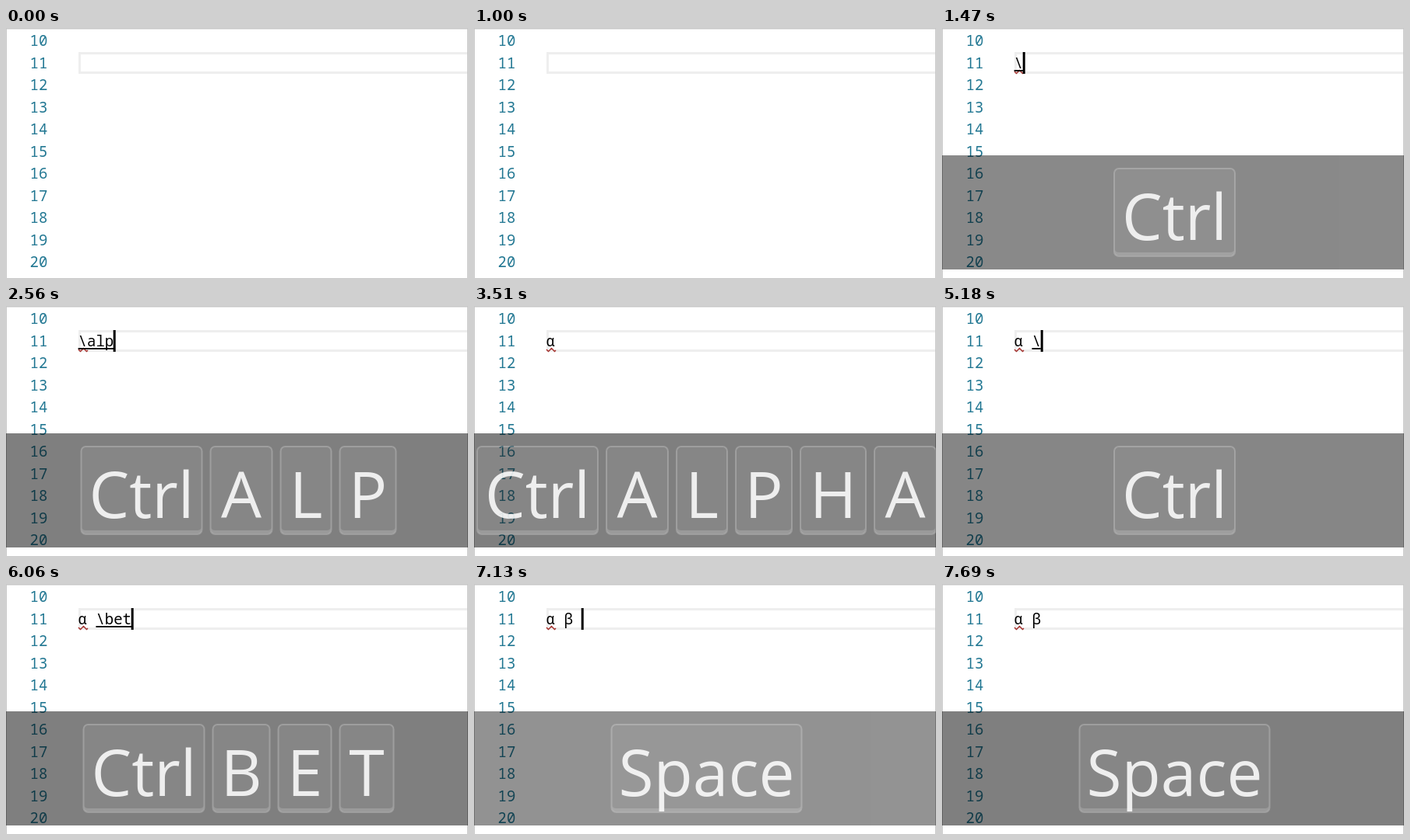
These frames come from a looping animation (593x322 px, 7990 ms). An HTML page:

```html
<!DOCTYPE html>
<html lang="en">
<head>
<meta charset="utf-8">
<title>Typing Greek letters</title>
<style>
  html, body { margin: 0; width: 100%; height: 100%; overflow: hidden; background: #fff; }
  svg { display: block; width: 593px; height: 322px; }
  .code { font: 19px "Noto Sans Mono", monospace; white-space: pre; }
  .number { fill: #237893; }
  .key text { font: 82px "Open Sans", "Noto Sans", sans-serif; text-anchor: middle; fill: #fff; fill-opacity: .86; }
  .key .face { fill: #fff; fill-opacity: .05; stroke: #fff; stroke-opacity: .22; stroke-width: 2; }
  .key .edge { fill: #fff; fill-opacity: .16; }
</style>
</head>
<body>
<svg viewBox="0 0 593 322">
  <rect width="593" height="322" fill="#fff"/>
  <g id="numbers"></g>
  <path d="M600 32.5H94.5V57.5H600" fill="none" stroke="#eee" stroke-width="3"/>
  <path d="M0 .75H593" stroke="#c8c8c8" stroke-width="1.5"/>
  <path d="M.5 0V322M592.5 0V322" stroke="#c8c8c8"/>
  <path id="squiggle" d="M93 56l2.5 2.5 4-4 4 4 1.5-1.5" fill="none" stroke="#a4302c" stroke-width="1.5"/>
  <text id="line" class="code" y="52"></text>
  <rect id="underline" y="54" height="1.8"/>
  <rect id="caret" y="31" width="3" height="28"/>
  <g id="overlay">
    <rect y="164" width="593" height="147" fill-opacity=".5"/>
    <g id="keys"></g>
  </g>
</svg>
<script>
const LOOP = 7990, LEFT = 92.6, ADVANCE = 11.4, LINE_HEIGHT = 28.5;
const KEY_GAP = 9, CENTER = 298.5;
const KEY_WIDTH = { Ctrl: 157, A: 81, L: 67, P: 74, H: 86, B: 75, E: 70, T: 71, Space: 246 };

// Each step changes only the listed properties, at the given time in ms.
const STEPS = [
  [0, { text: "", caret: false, keys: "", shown: 0 }],
  [470, { caret: true }],
  [1000, { caret: false }],
  [1300, { text: "\\", caret: true, keys: "Ctrl", shown: .4 }],
  [1390, { shown: .67 }],
  [1470, { shown: .92 }],
  [1550, { shown: 1 }],
  [1700, { caret: false }],
  [1930, { text: "\\a", caret: true, keys: "Ctrl A" }],
  [2330, { text: "\\al", keys: "Ctrl A L" }],
  [2560, { text: "\\alp", keys: "Ctrl A L P" }],
  [2810, { text: "\\alph", keys: "Ctrl A L P H" }],
  [3080, { text: "\\alpha", keys: "Ctrl A L P H A" }],
  [3130, { text: "α" }],
  [3510, { caret: false }],
  [3840, { text: "α ", caret: true, keys: "Space" }],
  [4320, { caret: false }],
  [4550, { shown: 0 }],
  [4780, { caret: true }],
  [4940, { text: "α \\", keys: "Ctrl", shown: .26 }],
  [5030, { shown: .53 }],
  [5100, { shown: .76 }],
  [5180, { shown: .95 }],
  [5260, { shown: 1 }],
  [5430, { caret: false }],
  [5590, { text: "α \\b", caret: true, keys: "Ctrl B" }],
  [5810, { text: "α \\be", keys: "Ctrl B E" }],
  [6060, { text: "α \\bet", keys: "Ctrl B E T" }],
  [6370, { text: "α \\beta", keys: "Ctrl B E T A" }],
  [6440, { text: "α β" }],
  [6900, { caret: false }],
  [7130, { text: "α β ", caret: true, keys: "Space", shown: .85 }],
  [7210, { shown: 1 }],
  [7690, { caret: false }]
];

let previous = {};
const states = STEPS.map(([time, change]) => previous = { ...previous, ...change, time });

const el = id => document.getElementById(id);
const columnX = column => LEFT + column * ADVANCE;

function keyCap(label, x) {
  const w = KEY_WIDTH[label];
  return `<g class="key" transform="translate(${x} 180)">
    <rect class="face" x="1" y="1" width="${w - 2}" height="113" rx="6"/>
    <path class="edge" d="M2 106q1 3 5 3H${w - 7}q4 0 5-3v3q0 4-5 4H7q-5 0-5-4z"/>
    <text x="${w / 2}" y="93">${label}</text></g>`;
}

function keyRow(labels) {
  const total = labels.reduce((sum, label) => sum + KEY_WIDTH[label] + KEY_GAP, -KEY_GAP);
  let x = CENTER - total / 2;
  return labels.map(label => {
    const cap = keyCap(label, x);
    x += KEY_WIDTH[label] + KEY_GAP;
    return cap;
  }).join("");
}

function render({ text, caret, keys, shown }) {
  const start = text.indexOf("\\");
  el("line").textContent = text;
  el("squiggle").style.display = text ? "" : "none";
  el("underline").setAttribute("x", columnX(Math.max(start, 0)));
  el("underline").setAttribute("width", start < 0 ? 0 : (text.length - start) * ADVANCE);
  el("caret").setAttribute("x", Math.round(columnX(text.length) - .3) + (text ? -.3 : 0.7));
  el("caret").style.display = caret ? "" : "none";
  el("keys").innerHTML = keyRow(keys.split(" ").filter(Boolean));
  el("overlay").style.opacity = shown;
}

el("line").setAttribute("x", LEFT);
el("numbers").innerHTML = Array.from({ length: 11 }, (_, i) =>
  `<text class="code number" x="30.5" y="${23.2 + i * LINE_HEIGHT}">${10 + i}</text>`).join("");

const begin = performance.now();
let current;
function tick() {
  const time = (performance.now() - begin) % LOOP;
  const state = states.findLast(s => s.time <= time) || states[0];
  if (state !== current) render(current = state);
  requestAnimationFrame(tick);
}
tick();
</script>
</body>
</html>
```
